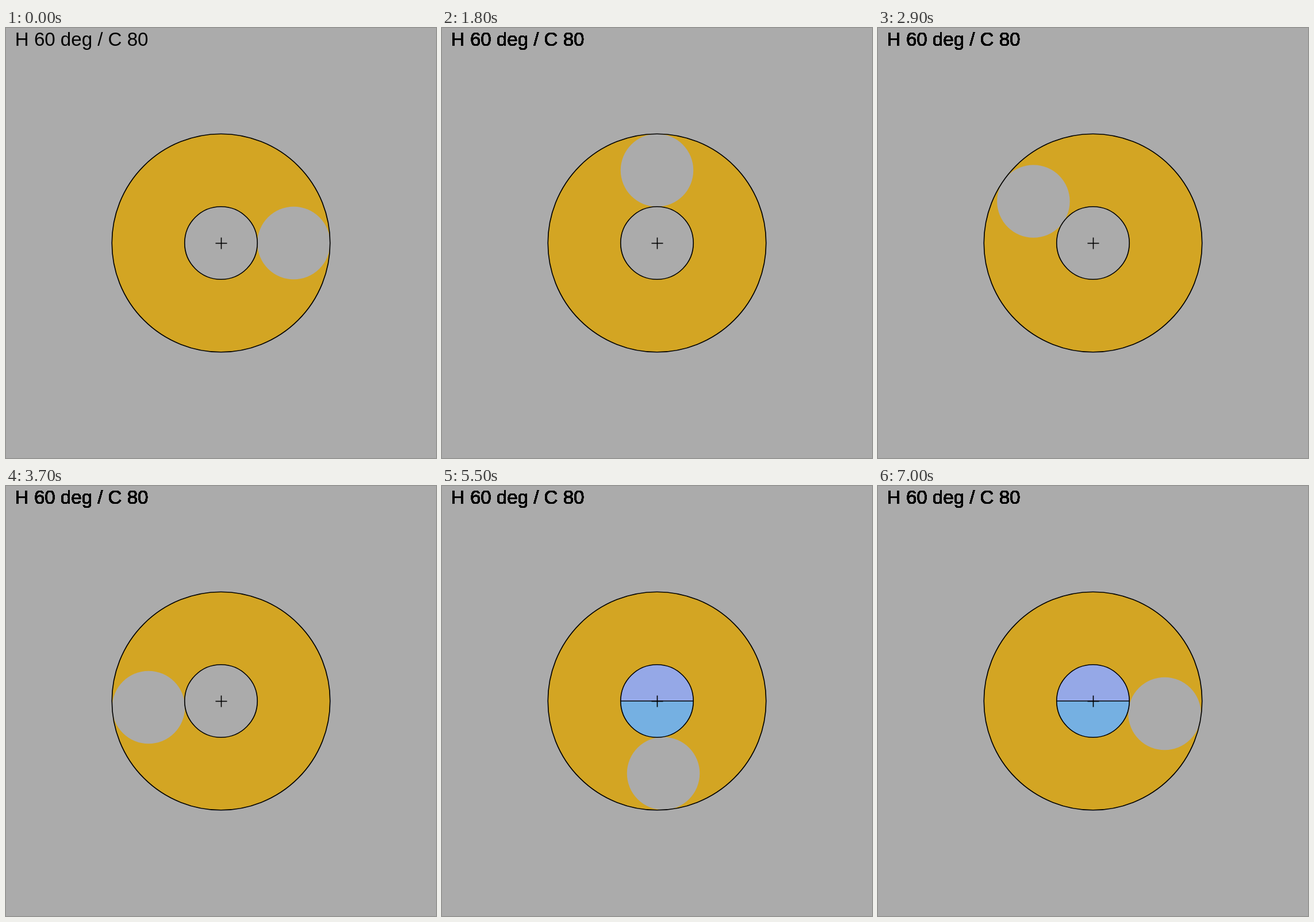
These frames come from a looping animation (748x748 px, 7.1 s). An HTML page with a canvas:

```html
<!DOCTYPE html>
<html lang="en">
<head>
<meta charset="utf-8">
<style>
html, body { margin: 0; width: 100%; height: 100%; overflow: hidden; background: #ababab; }
canvas { display: block; }
</style>
</head>
<body>
<canvas id="stage" width="748" height="748"></canvas>
<script>
const ctx = document.getElementById("stage").getContext("2d");
const CENTER = 374, UNIT = 63.25, STROKE = 1.65;
const STEP_MS = 100, STEPS = 71, DEGREES_PER_STEP = 5;
const HALVES_FROM_STEP = 50;
const GRAY = "#ababab", GOLD = "#d3a523", VIOLET = "#95a8e7", BLUE = "#75b0e2";

function disc(x, y, radius, color, from = 0, to = 2 * Math.PI) {
  ctx.fillStyle = color;
  ctx.beginPath();
  ctx.arc(x, y, radius, from, to);
  ctx.fill();
}

function outline(radius) {
  ctx.beginPath();
  ctx.arc(CENTER, CENTER, radius, 0, 2 * Math.PI);
  ctx.stroke();
}

function line(x1, y1, x2, y2) {
  ctx.beginPath();
  ctx.moveTo(x1, y1);
  ctx.lineTo(x2, y2);
  ctx.stroke();
}

function draw(step) {
  ctx.fillStyle = GRAY;
  ctx.fillRect(0, 0, 748, 748);
  ctx.strokeStyle = "#000";
  ctx.lineWidth = STROKE;

  disc(CENTER, CENTER, 3 * UNIT, GOLD);
  const angle = step * DEGREES_PER_STEP * Math.PI / 180;
  disc(CENTER + 2 * UNIT * Math.cos(angle), CENTER - 2 * UNIT * Math.sin(angle), UNIT, GRAY);
  disc(CENTER, CENTER, UNIT, GRAY);

  if (step >= HALVES_FROM_STEP) {
    disc(CENTER, CENTER, UNIT, VIOLET, Math.PI, 2 * Math.PI);
    disc(CENTER, CENTER, UNIT, BLUE, 0, Math.PI);
    line(CENTER - UNIT, CENTER, CENTER + UNIT, CENTER);
  }
  outline(3 * UNIT);
  outline(UNIT);

  const mid = CENTER + 0.5;
  line(mid - 10, mid, mid + 10, mid);
  line(mid, mid - 10, mid, mid + 10);

  // The label is overprinted once per step, so its edges harden over the loop.
  ctx.fillStyle = "#000";
  ctx.font = '33.1px "Liberation Sans", Arial, sans-serif';
  for (let i = 0; i <= step; i++) ctx.fillText("H 60 deg / C 80", 15.8, 31.1);
}

const start = performance.now();
let shown = -1;
function tick() {
  const elapsed = Math.max(0, performance.now() - start);
  const step = Math.floor(elapsed / STEP_MS) % STEPS;
  if (step !== shown) draw(shown = step);
  requestAnimationFrame(tick);
}
tick();
</script>
</body>
</html>
```
